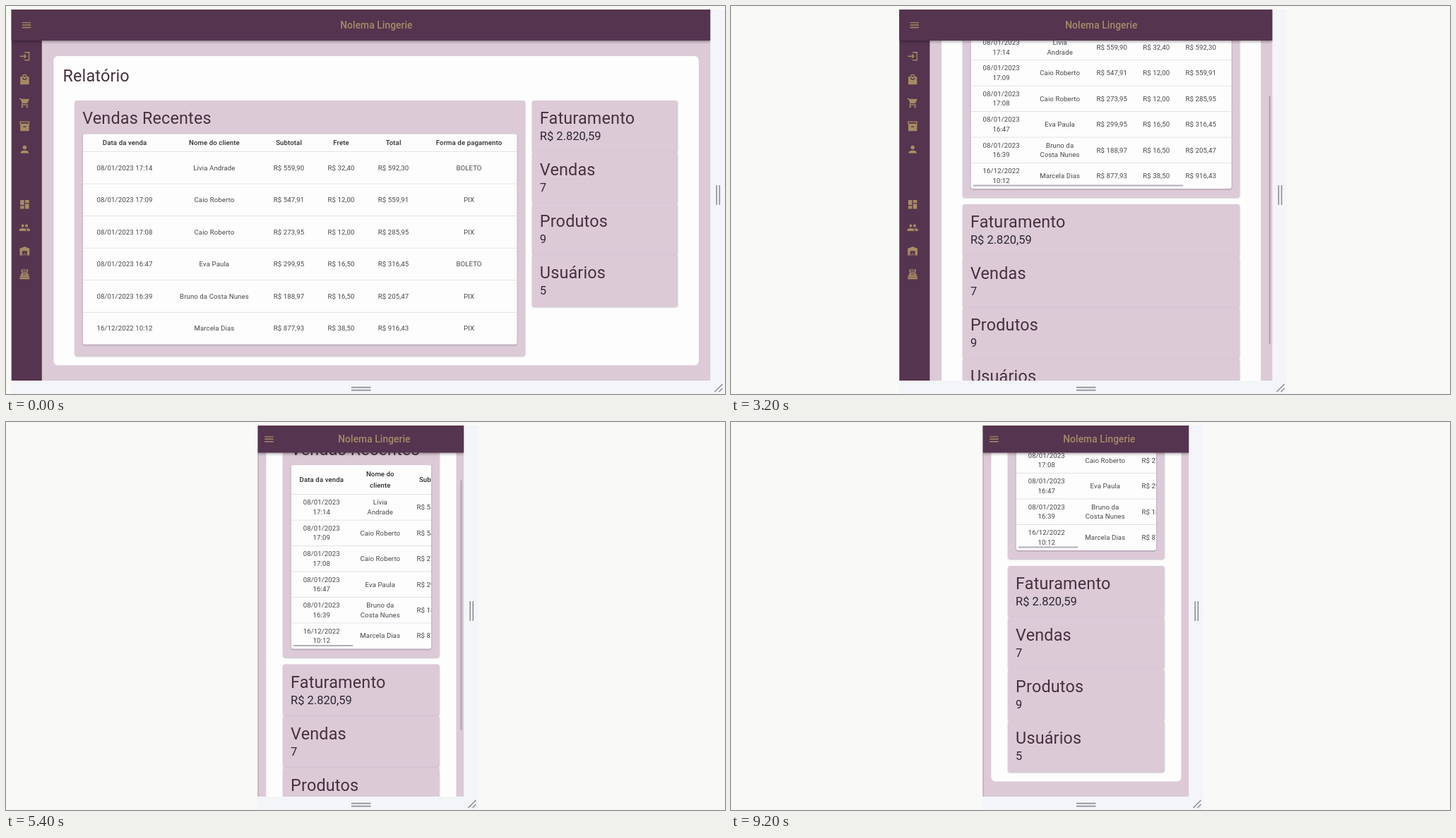
Write an HTML page that moves like this. It is 1018 px wide and 550 px high and loops after 9800 ms.

```html
<!DOCTYPE html>
<html lang="pt-BR">
<head>
<meta charset="utf-8">
<title>Relatório</title>
<style>
  html, body { margin: 0; width: 100%; height: 100%; overflow: hidden; background: #f9f9f7; }
  svg { display: block; }
  text { font-family: Roboto, "Liberation Sans", sans-serif; fill: #2c2830; white-space: pre; }
  .brand { font-size: 13.75px; font-weight: 500; letter-spacing: .1px; fill: #a68b67; text-anchor: middle; }
  .title { font-size: 23.4px; letter-spacing: .17px; fill: #46323f; }
  .value { font-size: 16.5px; }
  .cell { font-size: 9.625px; letter-spacing: .1px; text-anchor: middle; fill: #474349; }
  .head { font-weight: 500; fill: #2c292e; }
  .card { filter: drop-shadow(0 1px 1px rgba(60, 40, 70, .35)); }
  .bar { filter: drop-shadow(0 1px 2px rgba(0, 0, 0, .45)); }
</style>
</head>
<body>
<svg id="stage" width="1018" height="550"></svg>
<script>
const LOOP = 9800, STEP = 200;
const TOP = 5, VIEW = 526, CENTER = 502.4;
const LAPTOP_L = 990, LAPTOP = 705, TABLET = 528.5, PHONE = 292;
const PLUM = '#55344f', GOLD = '#a68b63', LILAC = '#dccad7', WHITE = '#fdfdfd';

const HEAD = ['Data da venda', 'Nome do|cliente', 'Subtotal', 'Frete', 'Total', 'Forma de|pagamento'];
const SALES = [
  ['08/01/2023|17:14', 'Lívia|Andrade', '559,90', '32,40', '592,30', 'BOLETO'],
  ['08/01/2023|17:09', 'Caio Roberto', '547,91', '12,00', '559,91', 'PIX'],
  ['08/01/2023|17:08', 'Caio Roberto', '273,95', '12,00', '285,95', 'PIX'],
  ['08/01/2023|16:47', 'Eva Paula', '299,95', '16,50', '316,45', 'BOLETO'],
  ['08/01/2023|16:39', 'Bruno da|Costa Nunes', '188,97', '16,50', '205,47', 'PIX'],
  ['16/12/2022|10:12', 'Marcela Dias', '877,93', '38,50', '916,43', 'PIX']
].map(row => row.map((cell, i) => i > 1 && i < 5 ? 'R$ ' + cell : cell));
const STATS = [['Faturamento', 'R$ 2.820,59'], ['Vendas', '7'], ['Produtos', '9'], ['Usuários', '5']];

const MENU = 'M3 6h18v2H3zm0 5h18v2H3zm0 5h18v2H3z';
const ICONS = {
  login: 'M11 7l5 5-5 5-1.4-1.4 2.6-2.6H2v-2h10.2L9.6 8.4zM12 3h10v18H12v-2h8V5h-8z',
  bag: 'M3 6h4a5 5 0 0 1 10 0h4v16H3zM9 6h6a3 3 0 0 0-6 0zM7 8a5 5 0 0 0 10 0h-2a3 3 0 0 1-6 0z',
  cart: 'M1 2h3l1 2h17l-4.5 9H8l-1 2h12v2H5l1.5-5L3 4H1zM5 20a2 2 0 0 1 4 0 2 2 0 0 1-4 0zM15 20a2 2 0 0 1 4 0 2 2 0 0 1-4 0z',
  box: 'M2 2h20v6h-1v14H3V8H2zM4 4v3h16V4zM9 12v2h6v-2z',
  person: 'M8 8a4 4 0 0 1 8 0 4 4 0 0 1-8 0zM4 20v-2c0-5 16-5 16 0v2z',
  dashboard: 'M3 3h8v10H3zm0 12h8v6H3zM13 3h8v6h-8zm0 8h8v10h-8z',
  people: 'M5 8a3 3 0 0 1 6 0 3 3 0 0 1-6 0zM13 8a3 3 0 0 1 6 0 3 3 0 0 1-6 0zM1 19v-3c0-4 14-4 14 0v3zM17 19v-3l-2-3c4 0 8 1 8 3v3z',
  warehouse: 'M2 21V7l10-4 10 4v14h-5v-9H7v9zM9 19h2v2H9zm2-3h2v2h-2zm2 3h2v2h-2z',
  till: 'M5 2h14v6H5zM7 4v2h10V4zM6 9h12l4 9H2zM8 11v1h8v-1zm-1 3v1h10v-1zM2 19h20v3H2z'
};

const rect = (x, y, w, h, fill, r = 0, cls = '') =>
  `<rect x="${x}" y="${y}" width="${w}" height="${h}" rx="${r}" fill="${fill}" class="${cls}"/>`;
const text = (x, y, str, cls) => `<text x="${x}" y="${y}" class="${cls}">${str}</text>`;
const clip = (x, y, w, h, body) => `<svg x="${x}" y="${y}" width="${w}" height="${h}">${body}</svg>`;
const icon = (cx, cy, d) =>
  `<path transform="translate(${cx - 8.25} ${cy - 8.25}) scale(.6875)" d="${d}" fill="${GOLD}" fill-rule="evenodd"/>`;
const lines = (d, w) => `<path d="${d}" stroke="#8b8e94" stroke-width="${w}" fill="none"/>`;

// Linear interpolation through [time, value] keys
function track(t, keys) {
  if (t <= keys[0][0]) return keys[0][1];
  for (let i = 1; i < keys.length; i++) {
    const [t0, a] = keys[i - 1], [t1, b] = keys[i];
    if (t <= t1) return a + (b - a) * (t - t0) / (t1 - t0);
  }
  return keys[keys.length - 1][1];
}

const widthAt = t => t < 1000 ? LAPTOP_L : t < 2200 ? LAPTOP : t < 4000 ? TABLET : PHONE;

function stateAt(t) {
  const scroll = t < 4200
    ? track(t, [[2600, 0], [3200, 183], [3400, 258], [3800, 163]])
    : track(t, [[5000, 157], [5400, 115], [6200, 38], [8000, 38], [8600, 254.5]]);
  return {
    device: widthAt(t),
    layout: widthAt(t - STEP), // the page reflows one step after the resize
    scroll,
    slide: track(t, [[6200, 0], [7000, 252], [7200, 252], [7600, 129.5], [8000, 0]]),
    drawer: track(t, [[4600, 33.2], [4800, 12], [5000, 1]]),
    thumb: [[2800, 3800], [5200, 6400], [8200, 8800]].some(([a, b]) => t >= a && t <= b)
  };
}

function table(x, y, w, wide, slide) {
  const headH = wide ? 25 : 41.7, rowH = wide ? 45.55 : 36.45;
  const h = headH + rowH * 6;
  const cols = wide ? [59.2, 186, 291.7, 365.7, 439.7, 546.6] : [43, 126, 199.5, 262.5, 325.5, 404];
  const cells = (row, cy, gap, cls) => row.map((cell, i) => {
    const parts = wide ? [cell.replace('|', ' ')] : cell.split('|');
    return parts.map((part, k) =>
      text(cols[i] - slide, cy + 3.3 + (k - (parts.length - 1) / 2) * gap, part, cls)).join('');
  }).join('');
  let body = cells(HEAD, headH / 2, 16.5, 'cell head');
  SALES.forEach((row, i) => {
    const top = headH + rowH * i;
    body += rect(0, top - .4, w, .8, '#dedae6') + cells(row, top + rowH / 2, 13.6, 'cell');
  });
  if (!wide) {
    const scale = (w - 6) / 450;
    body += rect(3 + slide * scale, h - 5.5, w * scale, 2, '#b3abba', 1);
  }
  return { h, svg: rect(x, y, w, h, WHITE, 3, 'card') + clip(x, y, w, h, body) };
}

function app({ device, layout, scroll, slide, drawer, thumb }) {
  const phone = layout === PHONE, wide = layout === LAPTOP_L, stacked = layout <= TABLET;
  const bar = phone ? 38.5 : 44, side = phone ? drawer : 43.5;
  const margin = phone ? 11 : 16.5, pad = phone ? 23.9 : 30;

  const sheetX = side + margin, sheetW = layout - side - margin * 2, sheetY = bar + 22 - scroll;
  const x = sheetX + pad, w = sheetW - pad * 2, y = sheetY + 63;
  const share = n => (w + 10) * n / 12 - 10;
  const cardW = stacked ? w : share(wide ? 9 : 8);
  const statW = stacked ? w : share(wide ? 3 : 4);
  const sales = table(x + 11.5, y + 47.5, cardW - 23, wide, slide);
  const cardH = 47.5 + sales.h + (wide ? 16 : 12);
  const statX = stacked ? x : x + w - statW;
  const statY = stacked ? y + cardH + 10 : y;
  const bottom = Math.max(y + cardH, statY + 292) + 13.5;

  let out = rect(0, 0, layout, VIEW, LILAC)
    + rect(sheetX, sheetY, sheetW, bottom - sheetY, WHITE, 6)
    + text(sheetX + 13, sheetY + 36.4, 'Relatório', 'title')
    + rect(x, y, cardW, cardH, LILAC, 3, 'card')
    + text(x + 10.8, y + 33.4, 'Vendas Recentes', 'title')
    + sales.svg;
  STATS.forEach(([name, value], i) => {
    const top = statY + 73 * i;
    out += rect(statX, top, statW, 73, LILAC, 3, 'card')
      + text(statX + 10.8, top + 33.4, name, 'title')
      + text(statX + 10.8, top + 56.3, value, 'value');
  });

  let menu = rect(0, 0, side, VIEW, PLUM);
  Object.values(ICONS).forEach((d, i) => {
    menu += icon(19, bar + 22.3 + 33 * i + (i > 4 ? 45 : 0), d);
  });
  out += clip(0, 0, side, VIEW, menu)
    + rect(0, 0, layout, bar, PLUM, 0, 'bar')
    + icon(phone ? 16 : 21.7, bar / 2, MENU)
    + text(layout / 2 + (phone ? 19 : 22), bar / 2 + 4.7, 'Nolema Lingerie', 'brand');

  if (thumb) {
    const page = bottom + scroll + 21.5;
    out += rect(layout - 5, scroll * VIEW / page, 2.2, VIEW * VIEW / page, '#b3a3b1', 1);
  }
  return clip(CENTER - device / 2, TOP, device, VIEW, out);
}

function frame(state) {
  const left = CENTER - state.device / 2, right = left + state.device;
  return rect(left, TOP, state.device + 20, 550 - TOP, '#f3f5f8')
    + app(state)
    + lines(`M${right + 8.7} 254v28m4.2 0v-28M489 540.6h27.5m0 4h-27.5`, 1.6)
    + lines(`M${right + 6} 547l11-11m0 6l-5 5`, 1.6);
}

const stage = document.getElementById('stage');
let shown = -1;
function tick(now) {
  const t = Math.floor(now % LOOP / STEP) * STEP;
  if (t !== shown) {
    shown = t;
    stage.innerHTML = frame(stateAt(t));
  }
  requestAnimationFrame(tick);
}
tick(performance.now());
</script>
</body>
</html>
```
